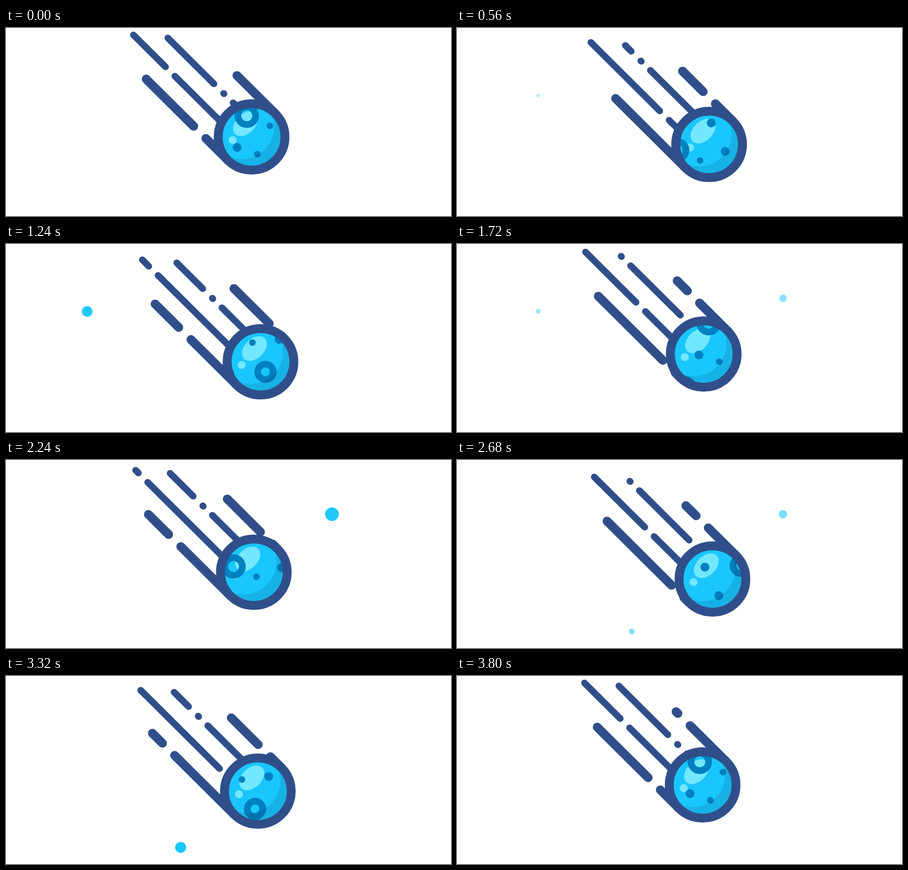
Recreate the animation shown at these times as an HTML page. Size 800 px wide and 340 px high, loop 3840 ms.

```html
<!DOCTYPE html>
<html lang="en">
<head>
<meta charset="utf-8">
<title>Comet</title>
<style>
  html, body { margin: 0; width: 100%; height: 100%; overflow: hidden; background: #fff; }
  svg { display: block; width: 800px; height: 340px; }
</style>
</head>
<body>
<svg viewBox="0 0 800 340">
  <defs><clipPath id="disc"><circle r="54"/></clipPath></defs>
  <g id="sparks" fill="#1ac6ff"></g>
  <g id="comet">
    <g id="trails" transform="rotate(45)" stroke="#304f8a" stroke-linecap="round"></g>
    <g clip-path="url(#disc)">
      <circle r="54" fill="#1ac6ff"/>
      <g fill="#73e7ff">
        <ellipse cx="-11" cy="-24" rx="26.3" ry="17.5" transform="rotate(-45 -11 -24)"/>
        <circle cx="-34" cy="5.7" r="7.2"/>
      </g>
      <g id="craters" fill="#0080c0"></g>
      <circle cx="-18.5" cy="-19" r="99" fill="none" stroke="#000" stroke-opacity=".1" stroke-width="80"/>
    </g>
    <circle r="60" fill="none" stroke="#304f8a" stroke-width="16"/>
  </g>
</svg>
<script>
const LOOP = 3840, SWAY = 1920, DASH = 960, DRIFT = 168;
const $ = id => document.getElementById(id);

function add(parent, tag, attrs) {
  const el = document.createElementNS('http://www.w3.org/2000/svg', tag);
  for (const name in attrs) el.setAttribute(name, attrs[name]);
  return parent.appendChild(el);
}

// y: distance from the axis, first: where the first gap starts, dashes: one full period
const trails = [
  { y: 19.8, start: -280.7, width: 12, first: 82, dashes: [200.6, 23.6] },
  { y: -20.1, start: -233, width: 12, first: 117.4, dashes: [126.7, 24.4, 1.2, 23.1] },
  { y: -60, start: -127.5, width: 16, first: -0.5, dashes: [96.5, 31] },
  { y: 60, start: -208, width: 16, first: 121, dashes: [177, 31] }
].map(({ y, start, width, first, dashes }) => {
  const period = dashes.reduce((a, b) => a + b);
  const el = add($('trails'), 'path', {
    d: `M${start} ${y}h${period}`, fill: 'none', 'stroke-width': width, 'stroke-dasharray': dashes.join(' ')
  });
  return { el, period, shift: dashes[0] - first };
});

// x, y, radius; the large ones are rings
const craters = [
  [-8.5, -38.5, 22], [117.5, -90.5, 20],
  [-26, 19, 8], [53, -88, 8], [78, -36.5, 8],
  [33, -20, 6], [10.5, 31, 6], [94, -143.5, 6]
];
for (const [x, y, r] of craters) {
  for (const d of [0, DRIFT]) {
    const at = { cx: x + d, cy: y - d };
    add($('craters'), 'circle', r > 10
      ? { ...at, r: r - 6, fill: 'none', stroke: '#0080c0', 'stroke-width': 12 }
      : { ...at, r });
  }
}

const sparks = [
  { cx: 146, cy: 122, r: 10, times: [240, 1400, 1900] },
  { cx: 586, cy: 98, r: 12.7, times: [1240, 2400, 2920] },
  { cx: 314, cy: 310, r: 10, times: [2200, 3340, 3800] }
].map(({ cx, cy, r, times }) => ({ el: add($('sparks'), 'circle', { cx, cy }), r, times }));

function pulse(t, [from, peak, to]) {
  if (t <= from || t >= to) return 0;
  const u = t < peak ? (t - from) / (peak - from) : (to - t) / (to - peak);
  return Math.sin(u * Math.PI / 2) ** 1.3;
}

function draw(now) {
  const t = now % LOOP;
  const phase = t % SWAY / SWAY;

  // the way out bows slightly, the way back is straight
  const p = (1 - Math.cos(phase * 2 * Math.PI)) / 2;
  const bow = phase < 0.5 ? 6 * p * (1 - p) ** 1.4 : 0;
  $('comet').setAttribute('transform', `translate(${441.5 + 20 * p - bow} ${197 + 20 * p + bow})`);

  const drift = DRIFT * phase;
  $('craters').setAttribute('transform', `translate(${-drift} ${drift})`);

  for (const { el, period, shift } of trails) {
    const offset = shift + period * t / DASH;
    el.setAttribute('stroke-dashoffset', (offset % period + period) % period);
  }

  for (const { el, r, times } of sparks) {
    const k = pulse(t, times);
    el.setAttribute('r', r * k);
    el.setAttribute('opacity', k);
  }
}

const begin = performance.now();
function tick() {
  draw(performance.now() - begin);
  requestAnimationFrame(tick);
}
tick();
</script>
</body>
</html>
```
